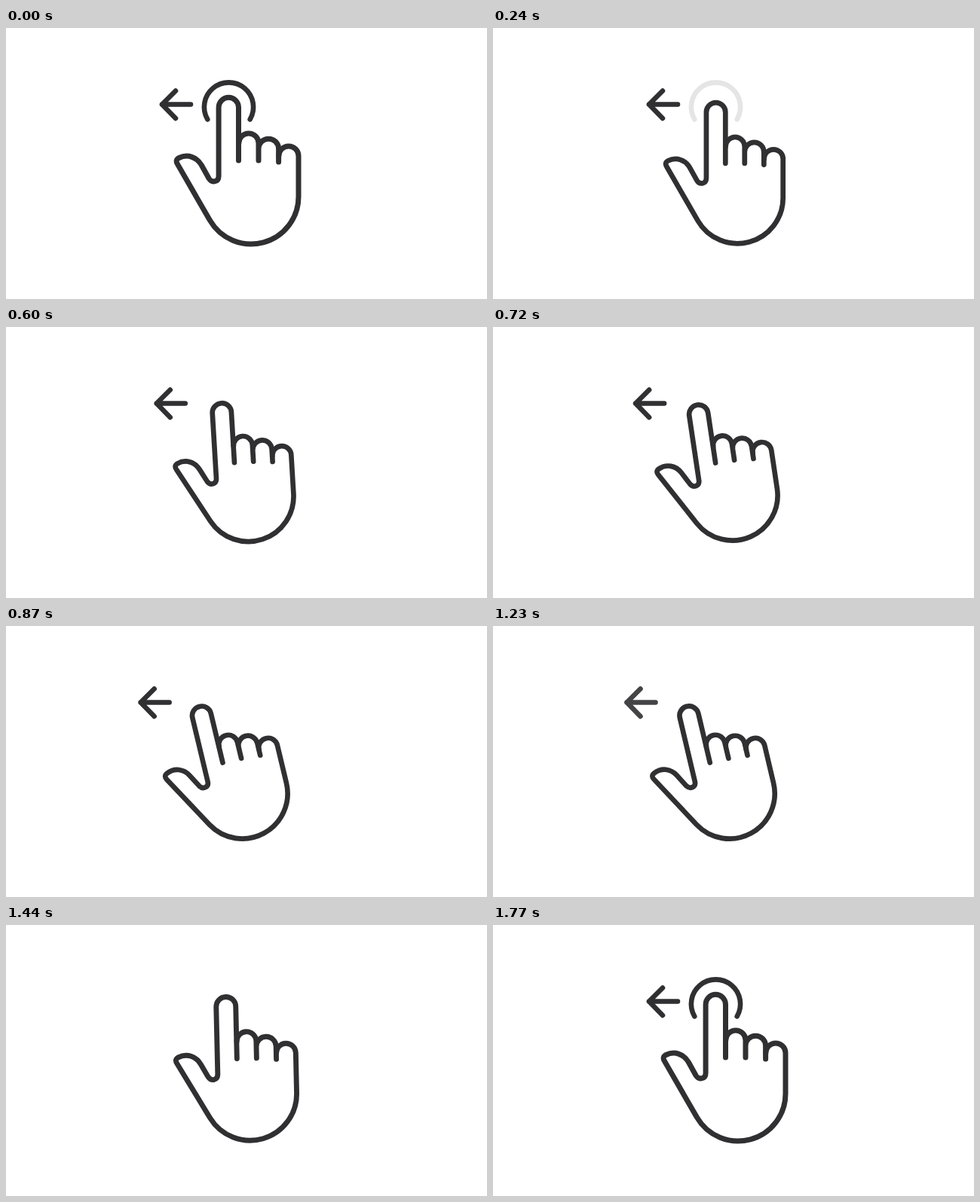
An HTML page for the animation above (1.8 s loop, 638 px wide and 360 px high).

```html
<!DOCTYPE html>
<html lang="en">
<head>
<meta charset="utf-8">
<title>Swipe left</title>
<style>
  html, body { margin: 0; width: 100%; height: 100%; overflow: hidden; background: #fff; }
  svg { display: block; width: 100vw; height: 100vh; }
</style>
</head>
<body>
<svg viewBox="0 0 638 360" fill="none" stroke="#302f31" stroke-width="6.6"
     stroke-linecap="round" stroke-linejoin="round">
  <path id="arrow" d="M245 101.5H207M225 83.5L207 101.5L225 120"/>
  <path id="ring" d="M267.3 121.3A32.6 32.6 0 1 1 323.7 121.3"/>
  <g id="hand" stroke-width="7">
    <!-- index finger, thumb, palm and little finger -->
    <path d="M308.5 176V105.5A13.2 13.2 0 0 0 282.1 105.5V196.5C282.1 205 273 206 269.2 200
             L259.5 182.5C253.5 171.5 241 167 229.5 172.5C225.5 174.5 225.5 177.5 227.3 180.5
             L270.5 255.6A63 63 0 0 0 388 224V170A13.1 13.1 0 0 0 361.8 170"/>
    <!-- middle and ring fingers -->
    <path d="M308.8 153A13.1 13.1 0 0 1 335 153V176M335 160.5A13.3 13.3 0 0 1 361.6 160.5V178"/>
  </g>
</svg>
<script>
  const LOOP = 1800;
  const [arrow, ring, hand] = ['arrow', 'ring', 'hand'].map(id => document.getElementById(id));

  // Eased progress from 0 to 1 between two times
  const ease = (t, from, to) => {
    const p = Math.min(1, Math.max(0, (t - from) / (to - from)));
    return p * p * (3 - 2 * p);
  };

  function draw(now) {
    const t = now % LOOP;
    const press = ease(t, 30, 310) - ease(t, 1240, 1580);
    const swipe = ease(t, 445, 928);
    const turn = swipe - ease(t, 1188, 1500);
    const show = ease(t, 1450, 1640);
    const shift = t < 1420 ? -29.5 * swipe : 0;

    hand.setAttribute('transform',
      `translate(303.5 269) rotate(${-14 * turn}) scale(${1 - 0.046 * press}) translate(-303.5 -269)`);
    arrow.setAttribute('transform', `translate(${shift} 0)`);
    arrow.setAttribute('opacity', 1 - ease(t, 1190, 1400) + show);
    ring.setAttribute('opacity', 1 - ease(t, 30, 300) + show);
  }

  const start = performance.now();
  function tick() {
    draw(performance.now() - start);
    requestAnimationFrame(tick);
  }
  tick();
</script>
</body>
</html>
```
